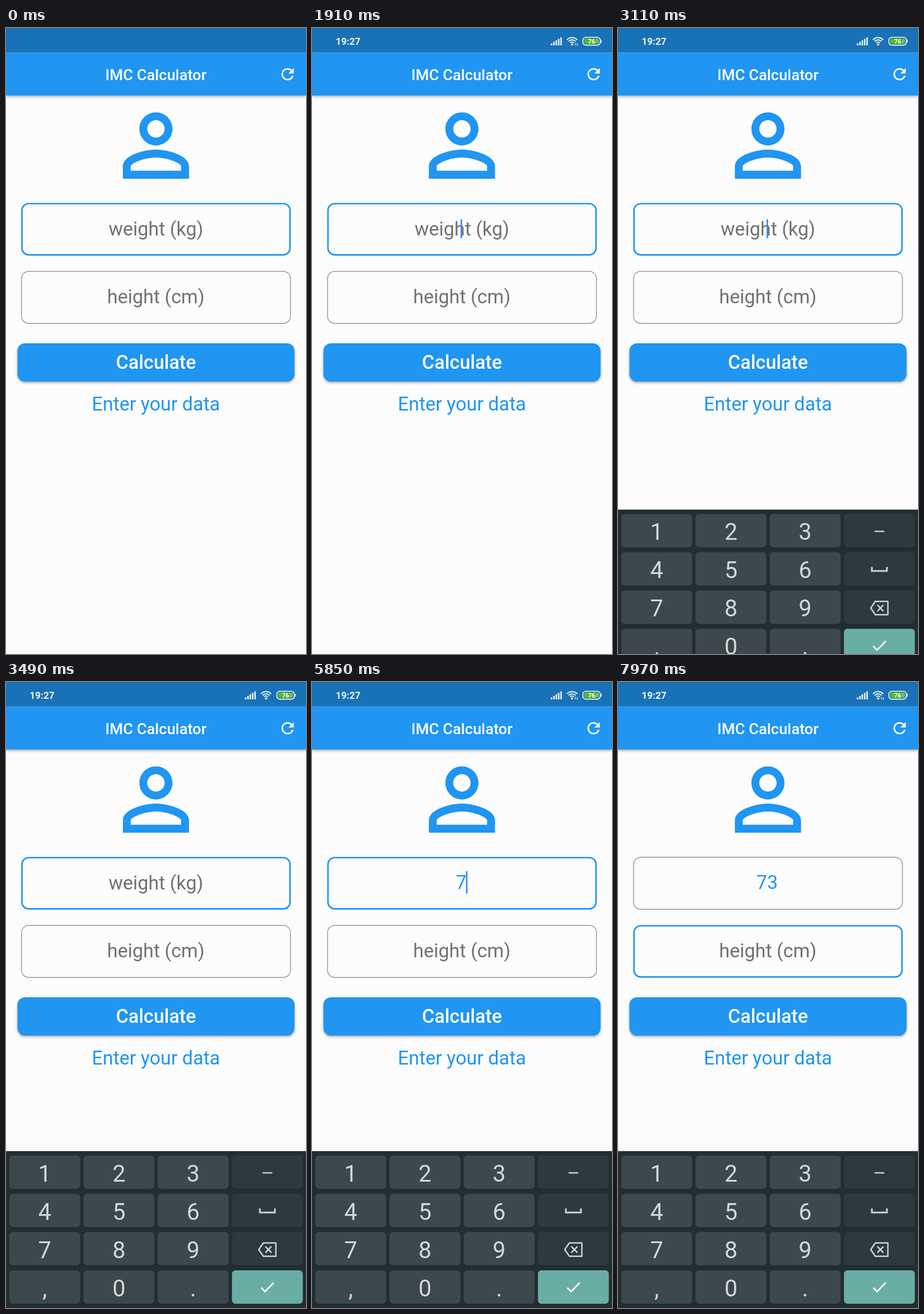
An HTML page with a canvas for the animation above (8000 ms loop, 519 px wide and 1080 px high).

```html
<!DOCTYPE html>
<html lang="en">
<head>
<meta charset="utf-8">
<title>IMC Calculator</title>
<style>
  html, body { margin: 0; width: 100%; height: 100%; overflow: hidden; background: #fcfcfd; }
  canvas { display: block; width: 519px; height: 1080px; }
</style>
</head>
<body>
<canvas id="stage" width="519" height="1080"></canvas>
<script>
const ctx = document.getElementById('stage').getContext('2d');
const W = 519, H = 1080, LOOP = 8000;
const BLUE = '#2095f2', GREY = [136, 136, 136], FOCUS = [32, 149, 242];
const KEYS = ['1', '2', '3', '-', '4', '5', '6', 'space', '7', '8', '9', 'back', ',', '0', '.', 'ok'];

const PERSON = new Path2D('M12 5.9c1.16 0 2.1.94 2.1 2.1s-.94 2.1-2.1 2.1S9.9 9.16 9.9 8s.94-2.1 2.1-2.1' +
  'm0 9c2.97 0 6.1 1.46 6.1 2.1v1.1H5.9V17c0-.64 3.13-2.1 6.1-2.1M12 4C9.79 4 8 5.79 8 8s1.79 4 4 4 ' +
  '4-1.79 4-4-1.79-4-4-4zm0 9c-2.67 0-8 1.34-8 4v3h16v-3c0-2.66-5.33-4-8-4z');
const REFRESH = new Path2D('M17.65 6.35C16.2 4.9 14.21 4 12 4c-4.42 0-7.99 3.58-7.99 8s3.57 8 7.99 8' +
  'c3.73 0 6.84-2.55 7.73-6h-2.08c-.82 2.33-3.04 4-5.65 4-3.31 0-6-2.69-6-6s2.69-6 6-6' +
  'c1.66 0 3.14.69 4.22 1.78L13 11h7V4l-2.35 2.35z');

const clamp = v => Math.max(0, Math.min(1, v));
const progress = (t, start, length) => clamp((t - start) / length);
const within = (t, a, b) => t >= a && t < b;
const mix = (a, b, p) => a + (b - a) * p;

function rect(x, y, w, h, color) {
  ctx.fillStyle = color;
  ctx.fillRect(x, y, w, h);
}

function round(x, y, w, h, r) {
  ctx.beginPath();
  ctx.roundRect(x, y, w, h, r);
}

function line(points, color, width) {
  ctx.beginPath();
  points.forEach(([x, y]) => ctx.lineTo(x, y));
  ctx.strokeStyle = color;
  ctx.lineWidth = width;
  ctx.stroke();
}

function text(str, x, y, size, color, weight = 400, align = 'center') {
  ctx.font = `${weight} ${size}px Roboto, sans-serif`;
  ctx.textAlign = align;
  ctx.fillStyle = color;
  ctx.fillText(str, x, y);
}

function icon(path, x, y, scale, color) {
  ctx.save();
  ctx.translate(x, y);
  ctx.scale(scale, scale);
  ctx.fillStyle = color;
  ctx.fill(path, 'evenodd');
  ctx.restore();
}

function shadowed(blur, dy, alpha, paint) {
  ctx.save();
  ctx.shadowColor = `rgba(0,0,0,${alpha})`;
  ctx.shadowBlur = blur;
  ctx.shadowOffsetY = dy;
  paint();
  ctx.restore();
}

function statusIcons(t) {
  ctx.save();
  ctx.globalAlpha = progress(t, 400, 120);
  text('19:27', 41, 28.8, 16.6, '#f2f7fb', 700, 'left');

  for (let i = 0; i < 5; i++) {
    const h = 3.5 + i * 2.6;
    rect(413.2 + i * 4.1, 30 - h, 2.6, h, '#e9f2f9');
  }

  ctx.strokeStyle = '#e9f2f9';
  ctx.lineWidth = 2;
  for (const r of [4.6, 8.4, 12.2]) {
    ctx.beginPath();
    ctx.arc(450, 28.8, r, -Math.PI * 0.76, -Math.PI * 0.24);
    ctx.stroke();
  }
  ctx.beginPath();
  ctx.arc(450, 28.3, 1.9, 0, 7);
  ctx.fillStyle = '#e9f2f9';
  ctx.fill();

  if (!within(t, 2500, 4200)) {
    line([[456, 30.5], [456, 26.2], [454.8, 27.6]], '#e9f2f9', 1);
    line([[459, 26.2], [459, 30.5], [460.2, 29.1]], '#e9f2f9', 1);
  }

  round(468.6, 16, 30.2, 13.6, 5);
  ctx.strokeStyle = '#f2f7fb';
  ctx.lineWidth = 1.6;
  ctx.stroke();
  round(471, 18.3, 25.4, 9, 3);
  ctx.fillStyle = '#83b765';
  ctx.fill();
  round(471, 18.3, 20, 9, [3, 0, 0, 3]);
  ctx.fillStyle = '#55bd1c';
  ctx.fill();
  rect(499.6, 20.5, 1.5, 4.6, '#f2f7fb');
  text('76', 483.8, 26.6, 10.5, '#fff', 700);
  ctx.restore();
}

function field(y, focus) {
  const w = mix(1.2, 2.64, focus);
  round(26.3 + w / 2, y + w / 2, 466.4 - w, 91 - w, 13 - w / 2);
  ctx.strokeStyle = `rgb(${GREY.map((c, i) => mix(c, FOCUS[i], focus))})`;
  ctx.lineWidth = w;
  ctx.stroke();
}

function fields(t) {
  const moved = progress(t, 7150, 167);
  field(301.7, 1 - moved);
  field(419.2, moved);

  const value = t < 5600 ? '' : t < 6100 ? '7' : '73';
  if (value) text(value, 258, 357.3, 33, BLUE);
  else text('weight (kg)', 259.3, 357.5, 33, '#707270');
  text('height (cm)', 259.3, 475, 33, '#707270');

  const inHeight = t >= 7110;
  const start = inHeight ? 7110 : value === '73' ? 6100 : value ? 5600 : 720;
  if (t < start || (t - start) % 1000 >= 500) return;
  const color = '#4384f2';
  if (inHeight) rect(257, 447.8, 2.6, 32.6, color);
  else if (!value) rect(257, 330, 2.6, 32.6, color);
  else rect(value === '7' ? 266.4 : 275.7, 326.3, 2.6, 38.6, color);
}

function keySymbol(name, cx, cy) {
  const ink = '#c9d0d2';
  ctx.lineJoin = 'miter';
  if (name === '-') {
    rect(cx - 8.5, cy - .5, 17, 2.4, ink);
  } else if (name === 'space') {
    line([[cx - 13, cy - 4], [cx - 13, cy + 3], [cx + 13, cy + 3], [cx + 13, cy - 4]], ink, 3);
  } else if (name === 'back') {
    ctx.lineJoin = 'round';
    ctx.beginPath();
    [[-7, -11.5], [14.7, -11.5], [14.7, 11.5], [-7, 11.5], [-15, 0]]
      .forEach(([x, y]) => ctx.lineTo(cx + x, cy + 1 + y));
    ctx.closePath();
    ctx.strokeStyle = ink;
    ctx.lineWidth = 2.5;
    ctx.stroke();
    for (const s of [-1, 1]) {
      line([[cx - 3.5, cy + 1 - 5.3 * s], [cx + 7, cy + 1 + 5.3 * s]], ink, 2.5);
    }
  } else if (name === 'ok') {
    line([[cx - 10.5, cy + .8], [cx - 4, cy + 7.5], [cx + 11, cy - 8]], '#eef6f5', 2.8);
  } else {
    text(name, cx, cy + 15.6, 40, '#d2d8d9');
  }
}

function keyboard(t) {
  if (t < 2920) return;
  const slide = 271 * Math.pow(1 - progress(t, 2920, 300), 2.5);
  const pressed = within(t, 5510, 5610) ? '7' : within(t, 6010, 6110) ? '3' : '';
  ctx.save();
  ctx.translate(0, slide);
  rect(0, 809.3, W, 271, '#222e32');
  KEYS.forEach((name, i) => {
    const col = i % 4, x = 5.7 + col * 128.4, y = 817 + Math.floor(i / 4) * 66;
    round(x, y + 1.2, 122.6, 57.8, 6);
    ctx.fillStyle = '#1b2528';
    ctx.fill();
    round(x, y, 122.6, 57.8, 6);
    ctx.fillStyle = name === pressed ? '#566264' : name === 'ok' ? '#6aada4' : col === 3 ? '#2e393e' : '#3c484b';
    ctx.fill();
    keySymbol(name, x + 61.3, y + 29.2);
  });
  ctx.restore();
}

function draw(t) {
  rect(0, 0, W, H, '#fcfcfd');
  shadowed(5, 2, .32, () => rect(0, 42.5, W, 74, BLUE));
  rect(0, 0, W, 42.5, '#1971b6');
  statusIcons(t);
  text('IMC Calculator', 259.4, 89.5, 26.43, '#fff', 500);
  icon(REFRESH, 471.3, 63.9, 1.3215, '#fff');
  icon(PERSON, 173.6, 116.9, 7.15, BLUE);

  fields(t);

  shadowed(4, 2, .35, () => {
    round(19.8, 544, 479.4, 66, 13.2);
    ctx.fillStyle = BLUE;
    ctx.fill();
  });
  text('Calculate', 259.5, 588, 33, '#fff', 500);
  text('Enter your data', 259.3, 660, 33, BLUE);
  keyboard(t);
}

function tick() {
  draw(performance.now() % LOOP);
  requestAnimationFrame(tick);
}
tick();
</script>
</body>
</html>
```
